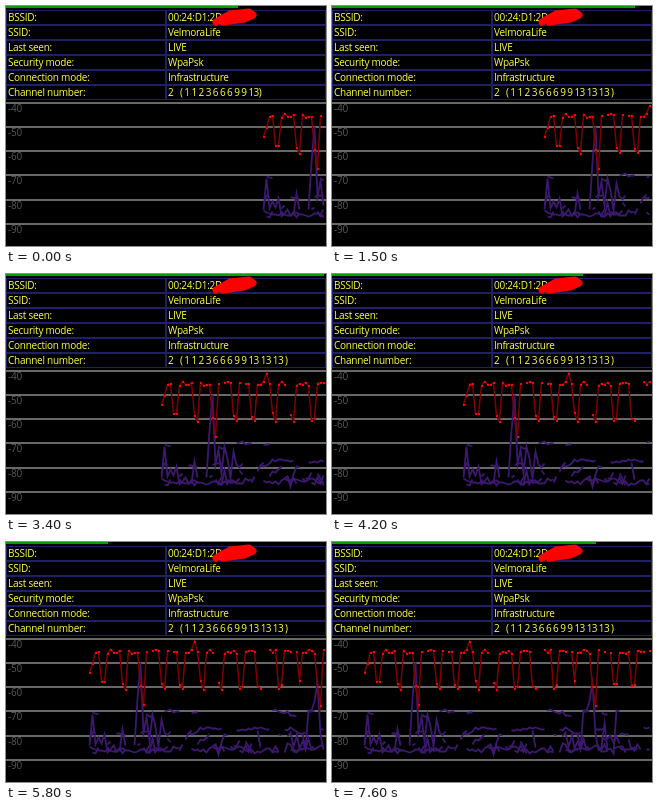
Recreate the animation shown at these times as an HTML page with a canvas. Size 320 by 240 pixels, loop 7.7 s.

```html
<!DOCTYPE html>
<html>
<head>
<meta charset="utf-8">
<style>
html, body { margin: 0; width: 100%; height: 100%; overflow: hidden; background: #000; }
canvas { display: block; width: 320px; height: 240px; }
</style>
</head>
<body>
<canvas id="stage" width="320" height="240"></canvas>
<script>
const ctx = document.getElementById('stage').getContext('2d');
const LOOP = 7700, STEP = 100, PITCH = 3, POINTS = 97;
const FONT = '10px "Open Sans", "Noto Sans", sans-serif';
const YELLOW = '#ffff40';

function noise(i, seed) {
  const v = Math.sin(i * 127.1 + seed * 311.7) * 43758.5453;
  return v - Math.floor(v);
}
const bump = (i, center, width) => Math.exp(-(((i - center) / width) ** 2));
const series = level => Array.from({ length: POINTS }, (_, i) => level(i));

// Main signal: steady, with a dip at regular intervals and short dropouts.
const signal = series(i => {
  const k = Math.round((i - 4.5) / 6.55);
  const offset = Math.abs(i - (4.5 + k * 6.55));
  const deep = 18 * (bump(i, 18, 0.8) + bump(i, 77, 0.8));
  if (offset < 1) return Math.round(138 + noise(i, 3) * 9 + deep);
  if (i > 18 && noise(i, 8) < 0.07) return null;
  const start = 22 * bump(i, 0, 1.3);
  const peak = 10 * (bump(i, 35, 0.6) + bump(i, 84, 0.6));
  return Math.round(107 + noise(i, 4) * 4 + start - peak);
});

// Neighbour that flares up in bursts, twice with a tall spike.
const flare = series(i => {
  const burst = Math.max(bump(i, 4, 5), bump(i, 21, 6), bump(i, 77, 8));
  if (burst < 0.3) return null;
  const spike = 50 * (bump(i, 17, 1) + bump(i, 75.5, 1));
  return Math.round(189 + (noise(i, 1) - 0.5) * 44 - spike);
});

// Weak neighbours hold a level for a few samples, jump, and sometimes vanish.
const neighbour = (seed, base, range, hold, loss) => series(i => {
  const k = Math.floor((i + seed) / hold);
  if (noise(k, seed + 20) < loss) return null;
  return Math.round(base + (noise(k, seed) - 0.5) * range + (noise(i, seed + 9) - 0.5) * 3);
});
const neighbours = [
  flare,
  neighbour(2, 207, 6, 3, 0.1),
  neighbour(6, 206, 9, 1, 0.25),
  neighbour(3, 200, 24, 1, 0.3),
  neighbour(5, 170, 6, 3, 0.65),
  neighbour(7, 188, 8, 4, 0.6)
];

// Scan progress: key times with the number of sweeps done.
const sweeps = [[0, .725], [15, 3.947], [34, 7.995], [50, 11.575], [58, 13.32], [70, 15.995], [76, 16.825]];
function progress(n) {
  const k = sweeps.findIndex(([t], i) => i > 0 && n <= t);
  const [a, from] = sweeps[k - 1], [b, to] = sweeps[k];
  const p = (from + (to - from) * (n - a) / (b - a)) % 1;
  return p < 0.1 ? 0 : Math.round(p * 320);
}

function text(str, x, y, color, spacing = -0.25) {
  ctx.font = FONT;
  ctx.letterSpacing = spacing + 'px';
  ctx.fillStyle = color;
  ctx.fillText(str, x, y);
}

function plot(data, left, color, width) {
  ctx.strokeStyle = color;
  ctx.lineWidth = width;
  ctx.beginPath();
  let open = false;
  data.forEach((y, i) => {
    const x = left + i * PITCH;
    if (y === null || x > 319) { open = false; return; }
    if (open) ctx.lineTo(x + 0.5, y + 0.5);
    else ctx.moveTo(x + 0.5, y + 0.5);
    open = true;
  });
  ctx.stroke();
}

function scribble() {
  ctx.strokeStyle = '#f00';
  ctx.lineCap = ctx.lineJoin = 'round';
  ctx.lineWidth = 7;
  ctx.beginPath();
  ctx.moveTo(210, 16);
  ctx.lineTo(224, 8);
  ctx.lineTo(243, 6);
  ctx.lineTo(247, 9);
  ctx.lineTo(238, 13);
  ctx.lineTo(217, 16);
  ctx.lineTo(232, 10);
  ctx.stroke();
  ctx.lineCap = 'butt';
  ctx.lineJoin = 'miter';
}

function table(n) {
  const channels = n < 7 ? '( 1 1 2 3 6 6 6 9 9 13)' : '( 1 1 2 3 6 6 6 9 9 13 13 13 )';
  const rows = [
    ['BSSID:', '00:24:D1:2D'],
    ['SSID:', 'VelmoraLife'],
    ['Last seen:', 'LIVE'],
    ['Security mode:', 'WpaPsk'],
    ['Connection mode:', 'Infrastructure'],
    ['Channel number:', '2']
  ];
  ctx.strokeStyle = '#202068';
  ctx.lineWidth = 1;
  rows.forEach(([label, value], r) => {
    const y = 4 + r * 15;
    ctx.strokeRect(0.5, y + 0.5, 159, 14);
    ctx.strokeRect(160.5, y + 0.5, 159, 14);
    text(label, 2, y + 11, YELLOW);
    text(value, 162, y + 11, YELLOW);
  });
  text(channels, 174, 90, YELLOW, -0.6);
  scribble();
}

function chart(left) {
  for (let k = 0; k < 6; k++) {
    const y = Math.round(95.5 + k * 24.3);
    ctx.fillStyle = '#686868';
    ctx.fillRect(0, y, 320, 2);
    text('-' + (40 + k * 10), 2, y + 10, '#585858');
  }
  neighbours.forEach(data => plot(data, left, '#3c1870', 1.8));
  plot(signal, left, '#800000', 1.5);
  ctx.fillStyle = '#f00';
  signal.forEach((y, i) => {
    const x = left + i * PITCH;
    if (y !== null && x < 319) ctx.fillRect(x, y, 2, 2);
  });
}

function draw(now) {
  const n = Math.floor((now % LOOP) / STEP);
  const shift = n < 65 ? n : n - 1; // one sample arrives late
  ctx.fillStyle = '#000';
  ctx.fillRect(0, 0, 320, 240);
  ctx.fillStyle = '#00a000';
  ctx.fillRect(0, 0, progress(n), 2);
  chart(257 - shift * PITCH);
  table(n);
}

const start = performance.now();
function tick() {
  draw(Math.max(0, performance.now() - start));
  requestAnimationFrame(tick);
}
tick();
</script>
</body>
</html>
```
